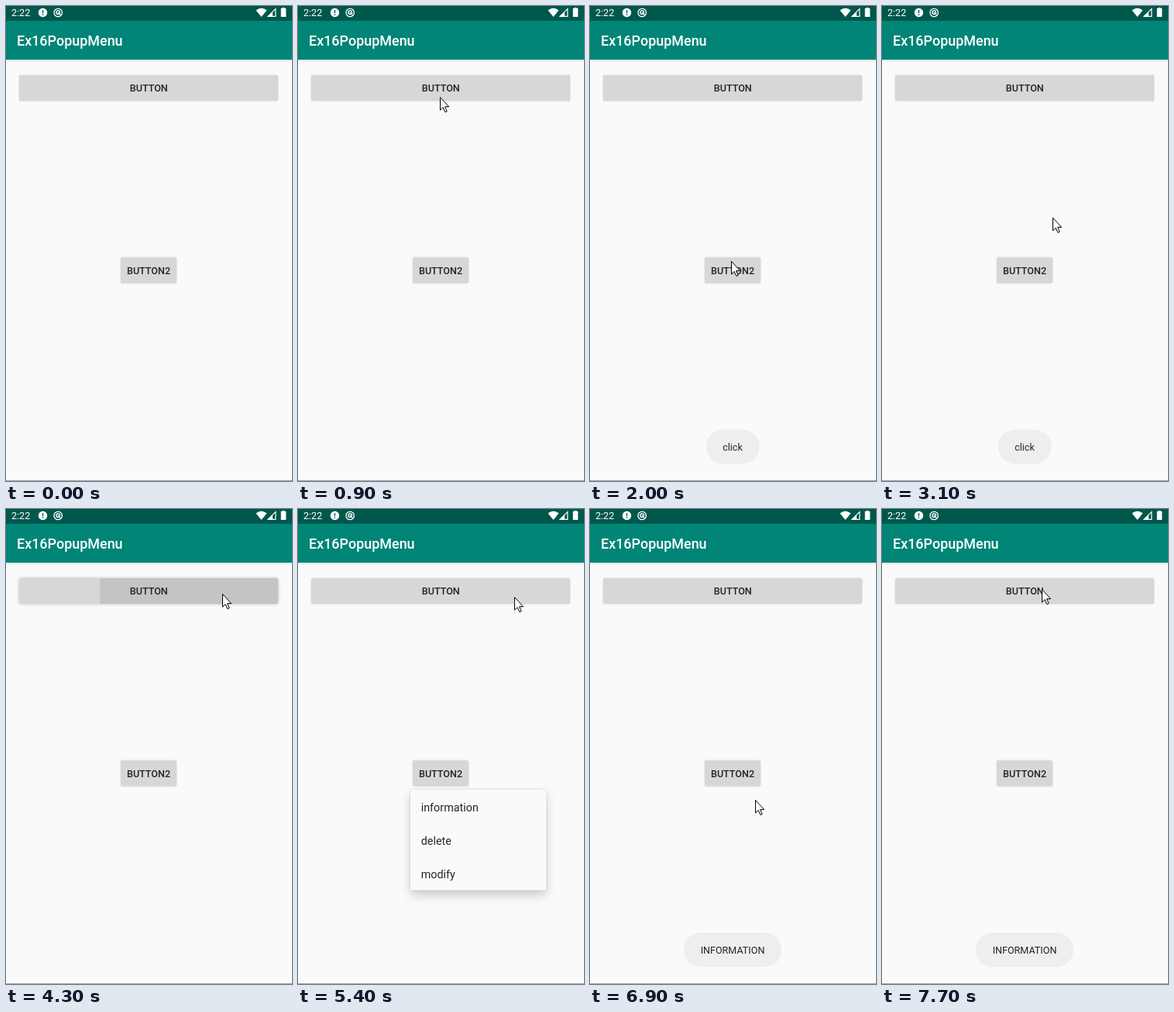
Animation of 369 by 611 pixels, one loop 8000 ms. Source, as an HTML page:

```html
<!DOCTYPE html>
<html lang="en">
<head>
<meta charset="utf-8">
<title>Popup menu</title>
<style>
  html, body { margin: 0; width: 100%; height: 100%; overflow: hidden; background: #fafafa; }
  svg { display: block; }
  text { font: 12.57px Roboto, sans-serif; fill: #242424; }
  .mid { text-anchor: middle; }
  .bold { font-weight: 500; }
  .title { font-size: 17.95px; fill: #fff; }
  .item { font-size: 14.36px; }
  .btn { fill: #d6d7d7; filter: drop-shadow(0 0 1px rgba(0,0,0,.16)); }
  .btn.down { filter: drop-shadow(0 .5px 2px rgba(0,0,0,.24)); }
  .bar { filter: drop-shadow(0 1px 1.5px rgba(0,0,0,.16)); }
  .shade { filter: blur(7px); }
  .sheet { fill: #fafafa; filter: drop-shadow(0 0 1px rgba(0,0,0,.16)); }
  .toast { fill: #eee; }
</style>
</head>
<body>
<svg width="369" height="611" viewBox="0 0 369 611">
  <defs>
    <clipPath id="clip1"><rect x="17" y="89" width="334" height="33" rx="2"/></clipPath>
    <clipPath id="clip2"><rect x="148" y="323.5" width="72" height="33" rx="2"/></clipPath>
    <clipPath id="clip3"><rect x="145" y="361.5" width="175" height="43"/></clipPath>
    <clipPath id="reveal"><rect id="window" x="100" y="340"/></clipPath>
  </defs>
  <rect width="369" height="611" fill="#fafafa"/>
  <rect y="610" width="369" height="1" fill="#a4a4a4"/>

  <rect class="bar" y="19" width="369" height="50" fill="#008577"/>
  <rect width="369" height="19" fill="#00574b"/>
  <text class="title bold" x="14" y="51">Ex16PopupMenu</text>
  <text x="7" y="13" style="fill:#fff">2:22</text>
  <g fill="#fff">
    <circle cx="47.5" cy="8.5" r="5.7"/>
    <path d="M47.5 5.2v4M47.5 10.4v1.5" stroke="#00574b" stroke-width="1.4"/>
    <circle cx="67.2" cy="8.5" r="5.2" fill="none" stroke="#fff" stroke-width="1.3"/>
    <circle cx="67.2" cy="8.2" r="2.3" fill="none" stroke="#fff" stroke-width="1.3"/>
    <path d="M67 8l3.4 3.6" stroke="#fff" stroke-width="1.3"/>
    <path d="M322.5 5.4Q329.5 0 336.5 5.4L329.5 14z"/>
    <path d="M338 13.4L347.8 3.6V13.4z" fill="none" stroke="#fff" stroke-width="1.2"/>
    <path d="M337.5 14L344 7.5V14z"/>
    <path d="M356.5 3v-1h3v1h1.8v11h-6.6V3z"/>
  </g>

  <rect class="btn" id="btn1" x="17" y="89" width="334" height="33" rx="2"/>
  <g clip-path="url(#clip1)"><circle id="rip1" cy="106"/></g>
  <text class="mid bold" x="184.3" y="110">BUTTON</text>

  <rect class="btn" id="btn2" x="148" y="323.5" width="72" height="33" rx="2"/>
  <g clip-path="url(#clip2)"><circle id="rip2" cx="184" cy="340"/></g>
  <text class="mid bold" x="184" y="344.7">BUTTON2</text>

  <g id="popup" clip-path="url(#reveal)">
    <rect class="shade" id="shade" x="145" y="367" width="175" height="130"/>
    <g id="menu">
      <rect class="sheet" x="145" y="361" width="175.5" height="129.5" rx="2"/>
      <g clip-path="url(#clip3)"><circle id="rip3" cx="232.5" cy="383"/></g>
      <text class="item" x="158.7" y="388.5">information</text>
      <text class="item" x="158.7" y="431.5">delete</text>
      <text class="item" x="158.7" y="474.5">modify</text>
    </g>
  </g>

  <g id="toast1">
    <rect class="toast" x="150" y="545" width="68.5" height="44" rx="21.5"/>
    <text class="mid" x="184" y="572">click</text>
  </g>
  <g id="toast2">
    <rect class="toast" x="121" y="545" width="126" height="44" rx="21.5"/>
    <text class="mid" x="184" y="572">INFORMATION</text>
  </g>

  <path id="cursor" d="M.5 .5V17L4.2 13.5L6.9 19.5L9.2 18.5L6.6 12.6H11.7z" fill="#fff" stroke="#000"/>
</svg>
<script>
const $ = id => document.getElementById(id);
const LOOP = 8000, STEP = 100;

// All times below are in steps of 100 ms.
const ramp = (t, start, length) => Math.min(1, Math.max(0, (t - start) / length));
const smooth = k => k * k * (3 - 2 * k);
const fade = (t, shown, hidden, length) => ramp(t, shown, length) * (1 - ramp(t, hidden, length));

function set(id, attrs) {
  for (const name in attrs) $(id).setAttribute(name, attrs[name]);
}

// Each move leaves from where the one before ended; bend is its sideways bulge.
const entry = { x: 333, y: 136 };
const moves = [
  { start: 2, end: 9, x: 183, y: 117, bend: -55 },
  { start: 14, end: 20, x: 182, y: 328, bend: 0 },
  { start: 20, end: 22, x: 183, y: 343, bend: 0 },
  { start: 28, end: 36, x: 279, y: 109, bend: 9 },
  { start: 53, end: 54, x: 279, y: 113, bend: 0 },
  { start: 54, end: 60, x: 210, y: 384, bend: 0 },
  { start: 68, end: 77, x: 206, y: 103, bend: 28 }
];

function pointer(t) {
  let { x, y } = entry;
  for (const move of moves) {
    if (t <= move.start) break;
    const k = smooth(ramp(t, move.start, move.end - move.start));
    const dx = move.x - x, dy = move.y - y;
    const side = move.bend * Math.sin(Math.PI * k) / Math.hypot(dx, dy);
    x += dx * k - dy * side;
    y += dy * k + dx * side;
  }
  return [Math.round(x), Math.round(y)];
}

// A press spreads to its reach in two steps and fades in three after release.
function ripple(n, t, { start, release, reach, strength = .09 }) {
  const opacity = t < start ? 0 : strength * (1 - ramp(t, release, 3));
  set("rip" + n, { r: reach * ramp(t, start - 1, 2), opacity });
  $("btn" + n)?.classList.toggle("down", opacity > 0);
}

function draw(ms) {
  const t = Math.floor(ms / STEP);
  set("cursor", {
    transform: `translate(${pointer(t)})`,
    visibility: t < 2 ? "hidden" : "visible"
  });

  const longPress = t >= 40;
  set("rip1", { cx: longPress ? 286 : 184 });
  ripple(1, t, longPress
    ? { start: 43, release: 47, reach: 330 }
    : { start: 11, release: 12, reach: 180 });
  ripple(2, t, { start: 24, release: 25, reach: 42 });
  ripple(3, t, { start: 63, release: 64, reach: 88, strength: .13 });

  const open = ramp(t, 48, 2), alpha = fade(t, 47, 63, 3);
  set("popup", { transform: `translate(0 ${28 * open - 28})` });
  set("window", { width: 192 + 77 * open, height: 106 + 114 * open });
  set("menu", { opacity: alpha });
  set("shade", { opacity: .18 * alpha });

  set("toast1", { opacity: fade(t, 11, 32, 4) });
  set("toast2", { opacity: ramp(t, 63, 4) });
}

function frame() {
  draw(performance.now() % LOOP);
  requestAnimationFrame(frame);
}
frame();
</script>
</body>
</html>
```
